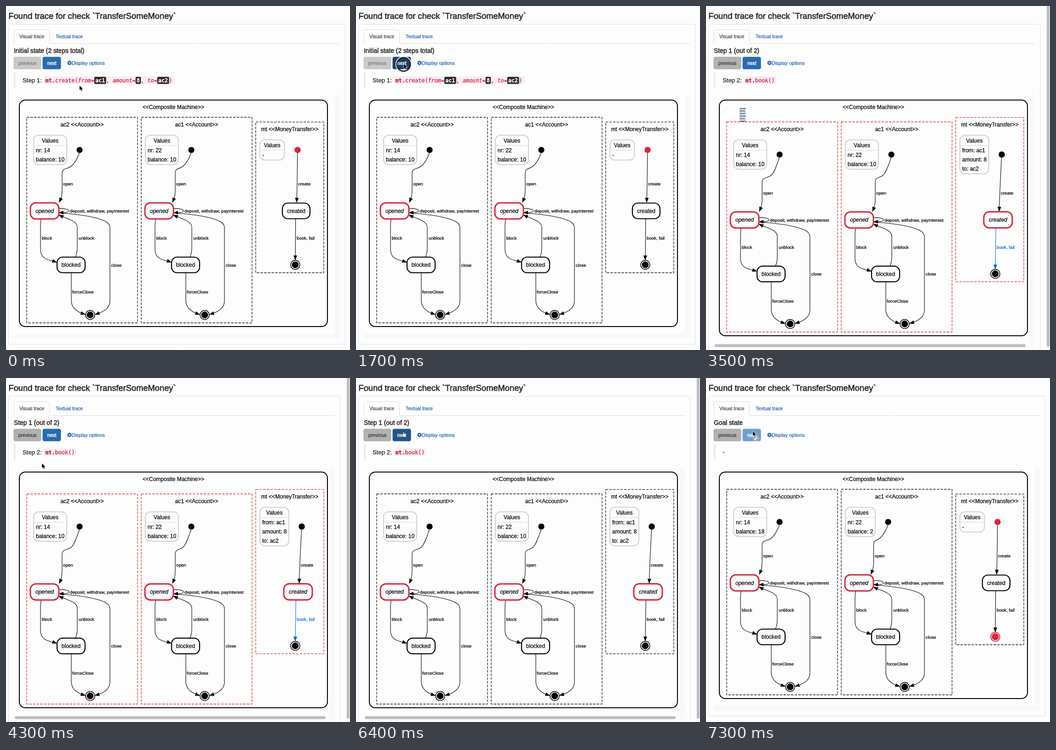
Recreate the animation shown at these times as an HTML page with a canvas. Size 748 by 748 pixels, loop 8000 ms.

```html
<!DOCTYPE html>
<html lang="en">
<head>
<meta charset="utf-8">
<title>Trace viewer</title>
<style>
html, body { margin: 0; width: 100%; height: 100%; overflow: hidden; background: #fdfdfd; }
canvas { display: block; width: 748px; height: 748px; }
</style>
</head>
<body>
<canvas id="stage"></canvas>
<script>
const LOOP = 8000, SIZE = 748;
const BG = '#fdfdfd', INK = '#000', RED = '#d9263a', BLUE = '#0a6be0', LINK = '#1f62b4';
const SANS = '"Liberation Sans", Arial, sans-serif';
const MONO = '"DejaVu Sans Mono", monospace';
const FIRST_STEP = 1900, GOAL = 6800, HIGHLIGHT_END = 4400;
const canvas = document.getElementById('stage');
const ctx = canvas.getContext('2d');
const ratio = window.devicePixelRatio || 1;
canvas.width = canvas.height = Math.round(SIZE * ratio);

// A thin outline in the text colour gives in-between font weights.
function text(str, x, y, size, { color = INK, style = '', align = 'left', family = SANS, extra = .25 } = {}) {
  ctx.font = `${style} ${size}px ${family}`;
  ctx.textAlign = align;
  ctx.fillStyle = ctx.strokeStyle = color;
  ctx.lineWidth = extra;
  ctx.lineJoin = 'round';
  ctx.fillText(str, x, y);
  ctx.strokeText(str, x, y);
}

function box(x, y, x2, y2, r, { fill, stroke, width = 1, dash = [] }) {
  ctx.beginPath();
  ctx.roundRect(x, y, x2 - x, y2 - y, r);
  if (fill) { ctx.fillStyle = fill; ctx.fill(); }
  if (stroke) {
    ctx.strokeStyle = stroke;
    ctx.lineWidth = width;
    ctx.setLineDash(dash);
    ctx.stroke();
    ctx.setLineDash([]);
  }
}

function path(d, color = INK, width = 1.1) {
  ctx.strokeStyle = color;
  ctx.lineWidth = width;
  ctx.stroke(new Path2D(d));
}

function disc(x, y, r, color) {
  ctx.beginPath();
  ctx.arc(x, y, r, 0, 7);
  ctx.fillStyle = color;
  ctx.fill();
}

function ring(x, y, r, color, width) {
  ctx.beginPath();
  ctx.arc(x, y, r, 0, 7);
  ctx.strokeStyle = color;
  ctx.lineWidth = width;
  ctx.stroke();
}

// Arrowhead at (x, y); angle in degrees, 0 points right.
function head(x, y, angle, color = INK) {
  ctx.save();
  ctx.translate(x, y);
  ctx.rotate(angle * Math.PI / 180);
  ctx.fillStyle = color;
  ctx.fill(new Path2D('M0 0L-11 -4L-11 4Z'));
  ctx.restore();
}

function finalDot(x, y, reached) {
  disc(x, y, 10.7, reached ? RED : INK);
  ring(x, y, 8.3, reached ? '#fff' : BG, reached ? 1.3 : 1.9);
}

function node(label, x, y, x2, y2, active) {
  box(x, y, x2, y2, 12, { fill: BG, stroke: active ? RED : INK, width: active ? 3 : 2.2 });
  text(label, (x + x2) / 2, (y + y2) / 2 + 4, 12, { align: 'center', style: active ? 'italic' : '' });
}

function values(x, y, width, rows) {
  box(x, y, x + width, y + 24 + rows.length * 20, 11, { stroke: '#d0d0d8', width: 2 });
  path(`M${x} ${y + 22.5}h${width}`, '#d8d8dc', 1);
  text('Values', x + width / 2, y + 16.3, 12, { align: 'center' });
  rows.forEach((row, i) => text(row, x + 5, y + 36.5 + i * 20, 12));
}

const label = (str, x, y, color) => text(str, x, y, 9.75, { color });

function cluster(title, x, y, x2, y2, hot) {
  box(x, y, x2, y2, 0, { stroke: hot ? '#d93c42' : '#222', width: 1.3, dash: [5.4, 2.6] });
  text(title, (x + x2) / 2, y + 19.5, 12, { align: 'center' });
}

function account(name, dx, up, rows, boxWidth, hot) {
  const low = up * 1.97;
  const top = dx ? 243 : 0;
  const slack = boxWidth - 72;
  const mid = dx ? 246 + slack / 2 : 0;
  cluster(`${name} <<Account>>`, 45 + dx, 242 + up, 286 + dx, 689 + up * 2, hot);
  values(60 + top, 281 + up, boxWidth, rows);

  const start = 160 + top + slack, line = 122 + mid;
  disc(start, 313 + up, 6.6, INK);
  path(`M${start - .5} ${320 + up}C${start - 5} ${332 + up} ${start - 11} ${343 + low} ${start - 19} ${349 + low}
    C${start - 27} ${355 + low} ${line} ${352 + low} ${line} ${364 + low}V${400 + low}Q${line} ${411 + low} ${line - 3} ${420 + low}`);
  head(line - 6.5, 428 + low, 113);
  label('open', line + 2, 390 + low);

  ctx.save();
  ctx.translate(dx, low);
  path('M115 440.5C128 440 137 442 137 445.3S132 449.5 124 449.7');
  head(114, 449.5, 179);
  path('M122 450.5C150 452.5 176 456 196 461C214 466 226 471 226 482V641C226 656 213 664 202 668');
  head(192.5, 671, 163);
  path('M151 546C155 537 155 530 155 520V481C155 470 141 465 124 458.5');
  head(114, 454, 205);
  path('M76.5 463C75 470 75 475 75 481V528C75 546 85 551 101 554.5');
  head(111.5, 557.5, 18);
  path('M142 580V640C142 655 152 663 164 668');
  head(173.5, 671, 17);
  label('deposit, withdraw, payInterest', 139, 449);
  label('block', 77.5, 508);
  label('unblock', 158, 508);
  label('close', 228.5, 566.5);
  label('forceClose', 144, 625.3);
  node('opened', 53, 428, 115, 463, true);
  node('blocked', 111, 546, 172, 580, false);
  finalDot(183, 671.7, false);
  ctx.restore();
}

function transfer(step, hot) {
  const on = step === 1;
  const top = on ? -10 : 0, low = on ? 19.7 : 0;
  const edge = hot ? BLUE : INK;
  cluster('mt <<MoneyTransfer>>', 543, 252.3 + top, 691, 580 + low, hot);
  values(552, 291 + top, on ? 63 : 53.5, on ? ['from: ac1', 'amount: 8', 'to: ac2'] : ['-']);
  const x = on ? 643 : 634, tip = on ? 637.5 : 632, y = on ? 323 : 313;
  disc(x, y, 6.8, on ? INK : RED);
  path(`M${x - .3} ${y + 7}Q${tip + 1.3} ${y + 76} ${tip + .3} ${418 + low}`);
  head(tip, 428 + low, 92);
  label('create', on ? 641 : 635, 390 + low);
  path(`M${on ? 630.4 : 629.7} ${463 + low}Q629.4 ${510 + low} 629.2 ${543 + low}`, edge);
  head(629, 553.5 + low, 90, edge);
  label('book, fail', 632, 508 + low, edge);
  if (on) node('created', 604, 447.5, 666, 482.5, true);
  else node('created', 601, 428.5, 661, 462.5, false);
  finalDot(629, 562.7 + low, step === 2);
}

function gear(x, y) {
  ring(x, y, 2.7, LINK, 2.2);
  for (let i = 0; i < 8; i++) {
    const c = Math.cos(i * Math.PI / 4), s = Math.sin(i * Math.PI / 4);
    path(`M${x + 3.2 * c} ${y + 3.2 * s}L${x + 5 * c} ${y + 5 * s}`, LINK, 1.8);
  }
}

// Each run is [string, style, key?]; keys are dark chips.
function code(runs, end) {
  box(83, 153, end, 170, 3, { fill: '#f9eef1' });
  let x = 85.5;
  for (const [str, style, key] of runs) {
    const w = str.length * 7.1;
    if (key) {
      box(x, 154, x + w + 4.5, 169.5, 2.5, { fill: '#2b2b2b' });
      text(str, x + 2.2, 165.5, 11.7, { style: 'bold', color: '#fff', family: MONO });
      x += w + 4.5;
    } else {
      text(str, x, 165.5, 11.8, { style, color: '#c4233f', family: MONO });
      x += w;
    }
  }
}

const pressed = t => (t >= 1600 && t < FIRST_STEP) || (t >= 6500 && t < GOAL);

function header(step, t) {
  const right = step === 1 ? 715.5 : 726.5;
  text('Found trace for check `TransferSomeMoney`', 5.5, 28, 18.3, { extra: .7, color: '#2c2c2c' });
  box(5.5, 39.5, right + 11.5, step === 1 ? 770 : 735.5, 4, { stroke: '#dedede' });
  path(`M17 81.5H17.5V55.5Q17.5 51.5 21.5 51.5H90.5Q94.5 51.5 94.5 55.5V81.5H${right}`, '#dcdcdc', 1);
  text('Visual trace', 29, 70.3, 10.45, { color: '#444' });
  text('Textual trace', 108, 70.3, 10.45, { color: LINK });
  const titles = ['Initial state (2 steps total)', 'Step 1 (out of 2)', 'Goal state'];
  text(titles[step], 17, 101.5, 13.8, { extra: .6, color: '#2c2c2c' });

  box(17, 111, 76, 137, 3, { fill: step ? '#b1b1b1' : '#c9c9c9', stroke: step ? '#a8a8a8' : '#c2c2c2' });
  text('previous', 46.5, 127.8, 10.5, { align: 'center', color: step ? '#333' : '#777' });
  const over = (t >= 1400 && t < 2900) || (t >= 6200 && t < GOAL);
  const fill = step === 2 ? '#6f9fca' : pressed(t) ? '#19416a' : over ? '#20568c' : '#286cae';
  box(80, 111, 119, 137, 3, { fill, stroke: fill });
  text('next', 99.5, 127.8, 10.6, { align: 'center', extra: .5, color: '#fff' });
  gear(138, 123.7);
  text('Display options', 143, 127.8, 10.6, { color: LINK });

  box(17, 144, 21, 178, 0, { fill: '#ececec' });
  if (step === 2) return text('-', 36, 165, 13.2, { color: '#222' });
  text(`Step ${step + 1}:`, 36, 165.7, 13.2, { color: '#222' });
  if (step) return code([['mt.', 'bold'], ['book()', '']], 153);
  code([['mt.', 'bold'], ['create(', ''], ['from', 'italic'], ['=', ''], ['ac1', '', true],
    [', ', ''], ['amount', 'italic'], ['=', ''], ['8', '', true],
    [', ', ''], ['to', 'italic'], ['=', ''], ['ac2', '', true], [')', '']], 367);
}

function scrollAreas(step) {
  if (step === 1) {
    box(704, 193, 715, 733, 0, { fill: '#f8f8f8' });
    box(17, 733, 715, 744, 0, { fill: '#fafafa' });
    box(19, 735.5, 695, 741.5, 3, { fill: '#bcbcbc' });
    box(738, 0, 748, 748, 0, { fill: '#fafafa' });
    box(741, -5, 747, 741, 3, { fill: '#bcbcbc' });
  } else {
    box(715, 193, 727, 723, 0, { fill: '#f8f8f8' });
    box(17, 713, 727, 723, 0, { fill: '#f8f8f8' });
  }
}

// Pointer stops: time, x, y.
const STOPS = [
  [0, 160, 173], [900, 160, 173], [1500, 104, 126], [2800, 104, 126], [3400, 80, 222],
  [3600, 80, 222], [4500, 78, 180.5], [5600, 78, 180.5], [6300, 102, 116], [8000, 102, 116]
];

function pointer(t) {
  const i = STOPS.findIndex((s, n) => n && t <= s[0]);
  const [t0, x0, y0] = STOPS[i - 1], [t1, x1, y1] = STOPS[i];
  const p = (t - t0) / (t1 - t0), e = p * p * (3 - 2 * p);
  return [x0 + (x1 - x0) * e, y0 + (y1 - y0) * e];
}

function cursor(t, step) {
  const [x, y] = pointer(t);
  if (t >= 3400 && t < 3600) {
    for (let i = 0; i < 11; i++) {
      box(73, y + i * 2.8, 87 - i % 3, y + 1.4 + i * 2.8, 0, { fill: i % 2 ? '#7fb4d8' : '#26384a' });
    }
    return;
  }
  if (pressed(t)) {
    ring(103.5, 127, 15.7, '#fff', 4);
    ring(103.5, 127, 14.8, '#111', 2.4);
  }
  const hand = (t >= FIRST_STEP && t < 2900) || (t >= 6200 && t < 6500);
  ctx.save();
  ctx.translate(x + (hand ? 2 : 0), y + (hand ? 1 : 0));
  ctx.scale(.9, .9);
  ctx.lineJoin = 'round';
  const shape = new Path2D(hand
    ? 'M-1.5 1Q-.5 0 .5 1V5L4 6Q6 6 5 9L4 12H-1L-4.5 8Q-4.5 6 -1.5 7Z'
    : 'M0 0V11L2.5 8.7L4.4 13L6.4 12.1L4.6 8H8Z');
  ctx.strokeStyle = hand ? '#111' : '#fff';
  ctx.fillStyle = hand ? '#fff' : '#000';
  ctx.lineWidth = hand ? 1.2 : 1.6;
  ctx.stroke(shape);
  ctx.fill(shape);
  ctx.restore();
  if (step === 2) {
    disc(108.5, 131.5, 6.3, '#fff');
    ring(108.5, 131.5, 4.8, '#777', 1.6);
    path('M105.2 128.2L111.8 134.8', '#777', 1.6);
  }
}

function draw(t) {
  const step = t < FIRST_STEP ? 0 : t < GOAL ? 1 : 2;
  const hot = step === 1 && t < HIGHLIGHT_END;
  const up = step === 1 ? 10 : 0;
  ctx.setTransform(ratio, 0, 0, ratio, 0, 0);
  ctx.fillStyle = BG;
  ctx.fillRect(0, 0, SIZE, SIZE);
  scrollAreas(step);
  header(step, t);
  box(29, 204.6, 699, 697 + up * 2, 13, { fill: BG, stroke: INK, width: 2 });
  text('<<Composite Machine>>', 364, step === 1 ? 223.5 : 224, 12, { align: 'center' });
  const done = step === 2;
  account('ac2', 0, up, ['nr: 14', `balance: ${done ? 18 : 10}`], 72, hot);
  account('ac1', 249, up, ['nr: 22', `balance: ${done ? 2 : 10}`], done ? 65 : 72, hot);
  transfer(step, hot);
  cursor(t, step);
}

function tick() {
  draw(Math.floor(performance.now() % LOOP / 100) * 100);
  requestAnimationFrame(tick);
}
tick();
</script>
</body>
</html>
```
